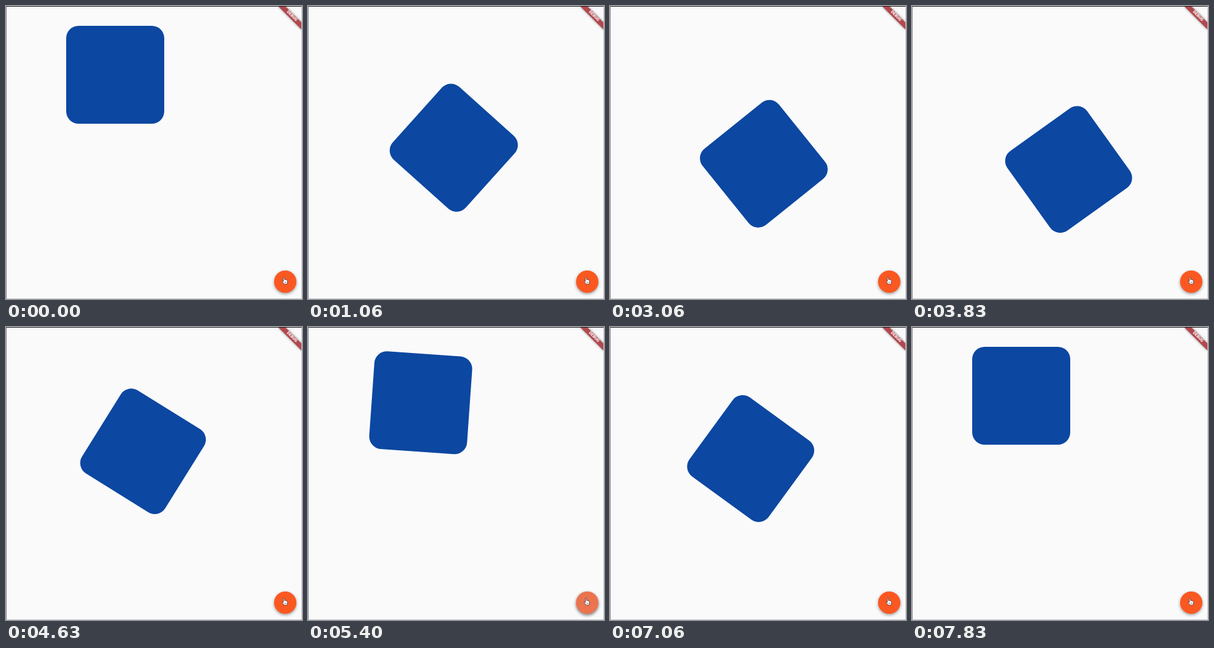
Write an HTML page that moves like this. It is 477 by 473 pixels and loops after 8.33 s.

```html
<!DOCTYPE html>
<html lang="en">
<head>
<meta charset="utf-8">
<title>Slide and turn</title>
<style>
  @property --p { syntax: "<number>"; inherits: false; initial-value: 0; }

  html, body { margin: 0; width: 100%; height: 100%; overflow: hidden; background: #fafafb; }

  .stage { position: relative; width: 477px; height: 473px; overflow: hidden; }
  .stage > * { position: absolute; }

  .edges {
    inset: 0;
    box-sizing: border-box;
    border: 1px solid;
    border-color: #1b191e #c9c6cf #c3bfca #8b8592;
  }

  /* --p is the progress along the path: 0 = top left, 1 = bottom right */
  .box {
    left: 97px; top: 31.5px;
    width: 158px; height: 158px;
    border-radius: 20px;
    background: #0c47a1;
    transform: translate(calc(var(--p) * 126.4px), calc(var(--p) * 252.8px))
               rotate(calc(var(--p) * 90deg));
    animation: travel 8.33s linear infinite;
  }
  @keyframes travel {
    0%, 1.537%       { --p: 0; }
    25.57%, 26.387%  { --p: 1; }
    40.936%          { --p: .394; }
    48.091%          { --p: .692; }
    63.481%, 63.745% { --p: 0; }
    79.364%          { --p: .637; }
    93.938%, 100%    { --p: 0; }
  }

  .banner {
    left: 476px; top: 1px;
    transform: rotate(45deg);
    transform-origin: 0 0;
  }
  .banner span {
    position: absolute;
    left: -26px; top: 18px;
    width: 52px; height: 7.7px;
    background: #b2494e;
    box-shadow: 0 0 4px rgba(0, 0, 0, .5);
    color: #fff;
    font: 900 6.6px/7.7px Roboto, sans-serif;
    text-align: center;
  }

  .fab {
    left: 431.5px; top: 427px;
    width: 36px; height: 36px;
    border-radius: 50%;
    background: #fb5821;
    box-shadow: 0 2px 4px rgba(0, 0, 0, .3), 0 1px 6px rgba(0, 0, 0, .1);
  }
  .tap, .tap::before {
    position: absolute;
    inset: 0;
    border-radius: 50%;
    animation: 8.33s linear var(--at) infinite backwards;
  }
  .tap { box-shadow: 0 3px 5px rgba(0, 0, 0, .18); animation-name: press; }
  .tap::before { content: ""; background: rgba(187, 200, 220, .25); animation-name: spread; }
  @keyframes press {
    0%           { opacity: 0; }
    .84%, 2.16%  { opacity: 1; }
    4.44%, 100%  { opacity: 0; }
  }
  @keyframes spread {
    0%          { transform: scale(.3); }
    1.4%, 100%  { transform: scale(1); }
  }

  .hand { left: 444px; top: 436px; }
</style>
</head>
<body>
<div class="stage">
  <div class="box"></div>
  <div class="banner"><span>DEBUG</span></div>
  <div class="fab">
    <i class="tap" style="--at: 58ms"></i>
    <i class="tap" style="--at: 2128ms"></i>
    <i class="tap" style="--at: 3340ms"></i>
    <i class="tap" style="--at: 3936ms"></i>
    <i class="tap" style="--at: 5230ms"></i>
    <i class="tap" style="--at: 6541ms"></i>
  </div>
  <svg class="hand" width="11" height="15" viewBox="0 0 11 15">
    <path d="M3 9V2.2Q3 1.2 3.9 1.2T4.8 2.2V5.6Q5.8 5 6.4 5.9Q7.4 5.4 8 6.4Q9.6 6 9.6 7.6V10Q9.6 11.4 8.7 13H4.2Q3.4 11.4 1.2 9.2Q.6 8 1.5 7.8Q2.2 7.9 3 9Z"
          fill="#fff" stroke="#33262a" stroke-width=".7" stroke-linejoin="round"/>
    <path d="M5 9.2V11.2M6.4 9.2V11.2M7.8 9.2V11.2" stroke="#4a3c40" stroke-width=".5"/>
  </svg>
  <div class="edges"></div>
</div>
</body>
</html>
```
